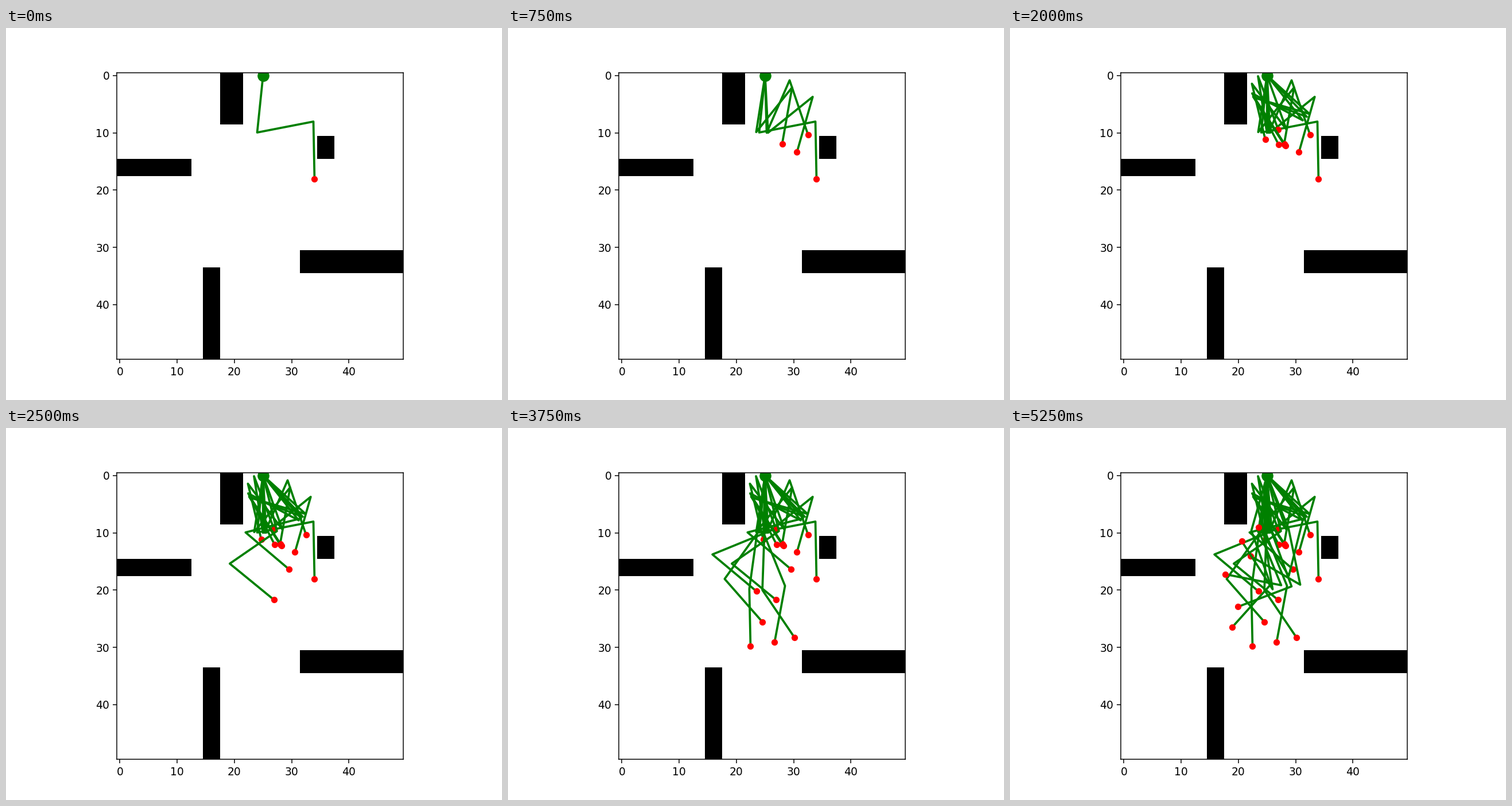
A matplotlib script that plays this animation: 864x648 px, repeating every 5.5 s.

```python
import matplotlib.pyplot as plt
import numpy as np
from matplotlib.animation import FuncAnimation

SIZE = 50
LINK = 10
BASE = (25, 0)

# Obstacles as row start, row end, column start, column end.
OBSTACLES = [(0, 9, 18, 22), (15, 18, 0, 13), (11, 15, 35, 38),
             (31, 35, 32, 50), (34, 50, 15, 18)]

# Heading of each link in degrees, measured from +x towards +y (down).
POSES = [
    (95.9, -11.0, 88.9), (87.0, -38.8, 105.9), (98.9, -51.2, 100.0),
    (88.4, -66.4, 71.3), (90.1, -99.0, 69.2), (70.3, -127.0, 76.5),
    (51.5, -151.9, 62.7), (42.1, -163.7, 57.0), (46.1, -159.5, 57.0),
    (48.4, 165.8, 40.3), (76.0, 145.4, 39.3), (89.6, 157.8, 39.9),
    (97.1, 125.6, 48.7), (90.7, 92.0, 55.9), (97.9, 97.9, 88.8),
    (91.6, 67.9, 100.5), (105.9, 70.4, 132.0), (85.1, 70.0, 159.2),
    (97.7, 67.6, -168.9), (68.0, 78.2, -150.0), (93.3, 81.1, -122.7),
    (51.5, 104.1, -121.6),
]


def joints(pose):
    heading = np.radians(pose)
    x = BASE[0] + LINK * np.cumsum(np.cos(heading))
    y = BASE[1] + LINK * np.cumsum(np.sin(heading))
    return np.r_[BASE[0], x], np.r_[BASE[1], y]


grid = np.zeros((SIZE, SIZE))
for top, bottom, left, right in OBSTACLES:
    grid[top:bottom, left:right] = 1

fig, ax = plt.subplots(figsize=(6.4, 4.8), dpi=135)
ax.imshow(grid, cmap="binary", interpolation="nearest")
ax.set_autoscale_on(False)
ax.plot(*BASE, "o", color="green", markersize=10)

arms = []
for pose in POSES:
    x, y = joints(pose)
    links, = ax.plot(x, y, color="green", linewidth=2)
    tip, = ax.plot(x[-1], y[-1], "o", color="red", markersize=5)
    arms.append((links, tip))


def update(frame):
    for i, arm in enumerate(arms):
        for artist in arm:
            artist.set_visible(i <= frame)
    return [artist for arm in arms for artist in arm]


anim = FuncAnimation(fig, update, frames=len(POSES), interval=250,
                     init_func=lambda: update(0), repeat=True, repeat_delay=0)
plt.show()
```
